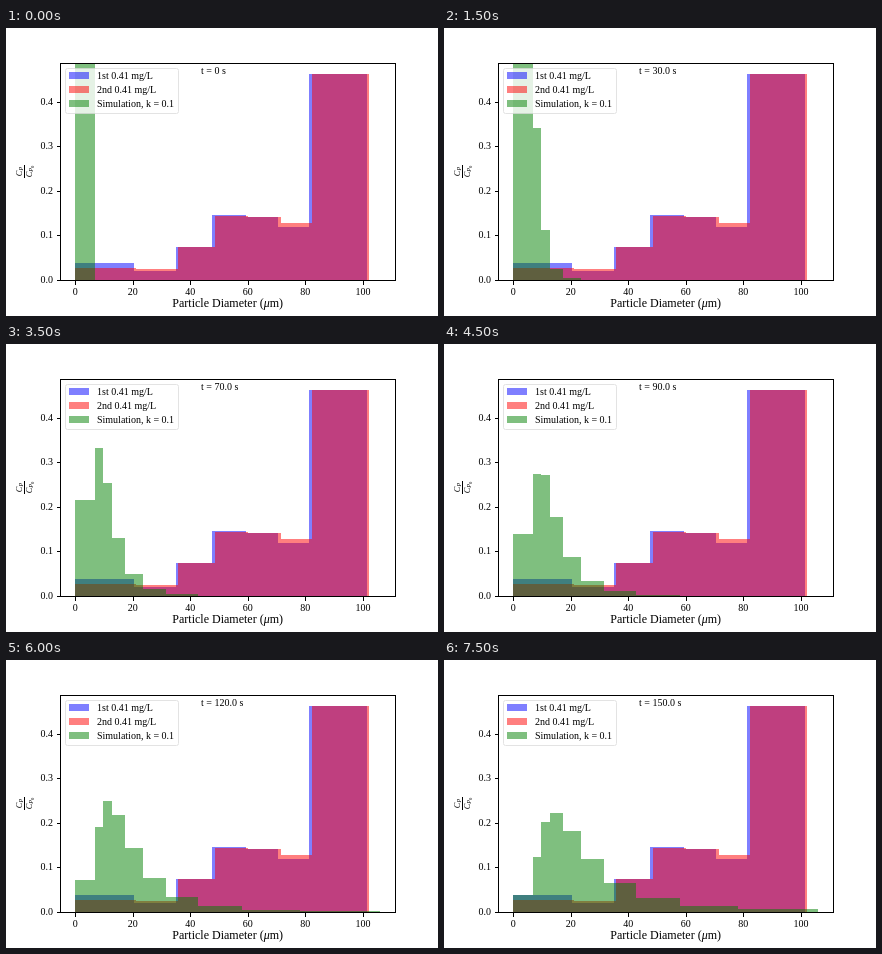
Animation of 432 by 288 pixels, one loop 8000 ms. Source, as an HTML page:

```html
<!DOCTYPE html>
<html lang="en">
<head>
<meta charset="utf-8">
<title>Particle size distribution</title>
<style>
  html, body { margin: 0; width: 100%; height: 100%; overflow: hidden; background: #fff; }
  svg { display: block; }
  text { font: 10px "Liberation Serif", "Times New Roman", serif; white-space: pre; }
  rect, .line { shape-rendering: crispEdges; }
  .line { stroke: #000; fill: none; }
  .first { fill: #00f; opacity: .5; }
  .second { fill: #f00; opacity: .5; }
  .model { fill: #008000; opacity: .5; }
  .mid { text-anchor: middle; }
  .end { text-anchor: end; }
  .label { font-size: 12px; }
  .frac { font-size: 8.4px; font-style: italic; }
  .sub { font-size: 6px; }
  .subsub { font-size: 4.6px; font-style: normal; }
</style>
</head>
<body>
<svg id="chart" width="432" height="288" viewBox="0 0 432 288">
  <g id="bars"></g>
  <path class="line" d="M54.5 35.5H389.5V252.5H54.5Z"/>
  <g id="ticks"></g>
  <text class="label mid" x="221.7" y="279">Particle Diameter (<tspan font-style="italic">μ</tspan>m)</text>
  <g transform="translate(18.5 143.5) rotate(-90)">
    <path class="line" d="M-6.5 0H6.5"/>
    <text class="frac mid" y="-2.8">C<tspan class="sub" dy="1.3">P</tspan></text>
    <text class="frac mid" y="7">C<tspan class="sub" dy="1.3">P</tspan><tspan class="subsub" dy="1">0</tspan></text>
  </g>
  <text id="clock" x="195" y="46"></text>
  <path d="M61.5 40.5H170.5a2 2 0 0 1 2 2V83.5a2 2 0 0 1-2 2H61.5a2 2 0 0 1-2-2V42.5a2 2 0 0 1 2-2Z"
        fill="#fff" stroke="#ddd" opacity=".8"/>
  <g id="legend"></g>
</svg>
<script>
const BASE = 252, TOP = 35, Y_SCALE = 446, X_ZERO = 69.2, X_SCALE = 2.877;
const STEP_MS = 500, STEPS = 16, STEP_SECONDS = 10, RATE = 0.0219;
const $ = id => document.getElementById(id);

function add(parent, tag, attrs, text = "") {
  const el = document.createElementNS("http://www.w3.org/2000/svg", tag);
  for (const key in attrs) el.setAttribute(key, attrs[key]);
  el.textContent = text;
  return $(parent).appendChild(el);
}

function addBars(cls, edges, tops) {
  return edges.slice(1).map((right, i) => add("bars", "rect", {
    class: cls, x: edges[i], width: right - edges[i], y: tops[i], height: BASE - tops[i]
  }));
}

addBars("first", [69, 128, 170, 206, 240, 272, 303, 361], [235, 243, 219, 187, 189, 199, 46]);
addBars("second", [69, 130, 172, 209, 242, 275, 306, 363], [240, 241, 219, 188, 189, 195, 46]);
const model = addBars("model", [69, 89, 97, 106, 119, 137, 160, 192, 236, 294, 374], Array(10).fill(BASE));

for (let v = 0; v <= 100; v += 20) {
  const x = X_ZERO + v * X_SCALE;
  add("ticks", "path", { class: "line", d: `M${Math.round(x) + 0.5} 253v3.5` });
  add("ticks", "text", { class: "mid", x, y: 266.5 }, v);
}
for (let i = 0; i < 5; i++) {
  const y = Math.round(BASE - i / 10 * Y_SCALE);
  add("ticks", "path", { class: "line", d: `M54 ${y + 0.5}h-3.5` });
  add("ticks", "text", { class: "end", x: 47, y: y + 3 }, (i / 10).toFixed(1));
}

[["first", "1st 0.41 mg/L"], ["second", "2nd 0.41 mg/L"], ["model", "Simulation, k = 0.1"]].forEach(([cls, name], i) => {
  add("legend", "rect", { class: cls, x: 63, y: 44 + 14 * i, width: 20, height: 7 });
  add("legend", "text", { x: 91, y: 51 + 14 * i }, name);
});

// Mass moves up the size classes as a Poisson process; the last class keeps the rest.
function drawStep(step) {
  const t = step * STEP_SECONDS, mean = RATE * t;
  let share = Math.exp(-mean), rest = 1;
  model.forEach((bar, i) => {
    const value = i < model.length - 1 ? share : rest;
    const y = Math.max(TOP, Math.round(BASE - value * Y_SCALE));
    bar.setAttribute("y", y);
    bar.setAttribute("height", BASE - y);
    rest -= share;
    share *= mean / (i + 1);
  });
  $("clock").textContent = `t = ${t ? t.toFixed(1) : 0} s`;
}

const start = performance.now();
function tick() {
  drawStep(Math.floor((performance.now() - start) / STEP_MS) % STEPS);
  requestAnimationFrame(tick);
}
tick();
</script>
</body>
</html>
```
